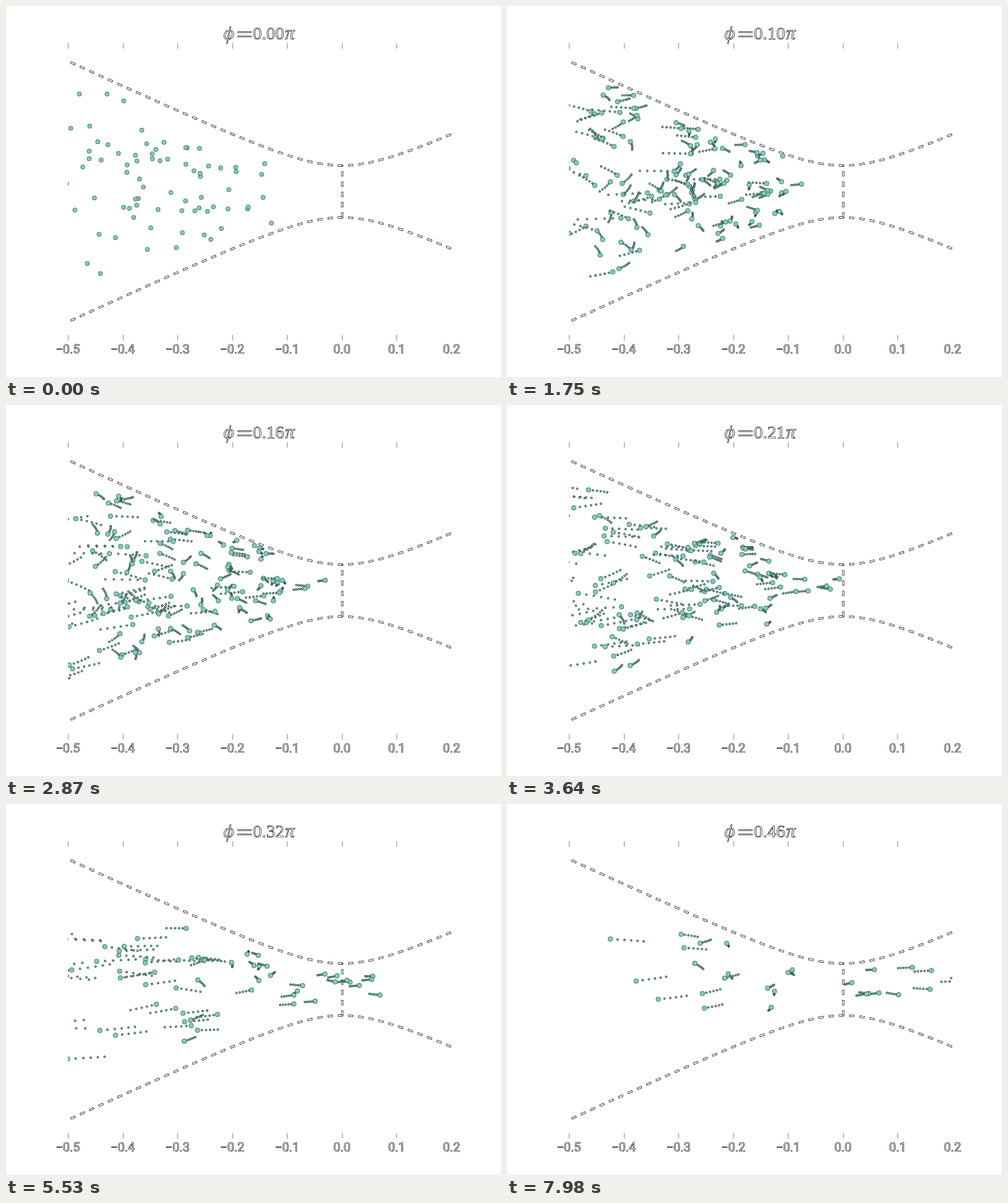
Animation of 800 by 600 pixels, one loop 8000 ms. Source, as an HTML page with a canvas:

```html
<!DOCTYPE html>
<html lang="en">
<head>
<meta charset="utf-8">
<title>Particles at a saddle</title>
<style>
  html, body { margin: 0; width: 100%; height: 100%; overflow: hidden; background: #fff; }
  canvas { display: block; }
</style>
</head>
<body>
<canvas id="stage" width="800" height="600"></canvas>
<script>
const ctx = document.getElementById('stage').getContext('2d');
const LOOP = 8000, STEP = 70, TAIL = 5;
const CX = 543, CY = 300, LEFT = 100, RIGHT = 720, TICK = 620 / 7;
const RATE = 0.036;    // exponential growth of the distance to the barrier, per step
const SWING = 0.018;   // slow vertical oscillation, radians per step

let seed = 11;
function random() {
  seed = (seed * 16807) % 2147483647;
  return seed / 2147483647;
}
const between = (low, high) => low + (high - low) * random();

const halfWidth = x => 42 * Math.hypot(1, (x - CX) / 90);

// Particles climb an inverted parabola: most turn back at distance `reach`, a few cross it.
const particles = [];
function addGroup(count, crosses, firstTurn, lastTurn, minReach, maxReach) {
  for (let i = 0; i < count; i++) {
    const turn = firstTurn + (lastTurn - firstTurn) * (i + random()) / count;
    const reach = between(minReach, maxReach);
    const swing = crosses ? between(15, 40) : 0.97 * halfWidth(CX - reach);
    const phase = Math.acos(between(-1, 0.75)) * (random() < 0.5 ? -1 : 1);
    particles.push({ crosses, turn, reach, swing, phase });
  }
}
addGroup(115, false, 12, 46, 90, 400);
addGroup(20, false, 60, 118, 50, 230);
addGroup(13, true, 52, 110, 45, 85);

function place(p, n) {
  const d = n - p.turn;
  const offset = p.crosses ? Math.sinh(RATE * d) : -Math.cosh(RATE * d);
  return [CX + p.reach * offset, CY + p.swing * Math.cos(SWING * d + p.phase)];
}

function dot([x, y], radius) {
  if (x < LEFT - 5 || x > RIGHT + 5) return;
  ctx.beginPath();
  ctx.arc(x, y, radius, 0, 2 * Math.PI);
  ctx.fill();
  ctx.stroke();
}

function drawParticles(n) {
  ctx.save();
  ctx.beginPath();
  ctx.rect(LEFT, 65, RIGHT - LEFT, 472);
  ctx.clip();
  ctx.fillStyle = '#7fcdbb';
  ctx.strokeStyle = '#1c302c';
  for (const p of particles) {
    ctx.lineWidth = 0.9;
    for (let k = Math.min(TAIL, n); k > 0; k--) dot(place(p, n - k), 1.5);
    ctx.lineWidth = 0.6;
    dot(place(p, n), n ? 3.8 : 3.5);
  }
  ctx.restore();
}

function hollowDashes(path) {
  ctx.strokeStyle = '#111';
  ctx.lineWidth = 3.6;
  ctx.setLineDash([8.3, 8.3]);
  ctx.lineDashOffset = 0;
  ctx.stroke(path);
  ctx.strokeStyle = '#fff';
  ctx.lineWidth = 2.1;
  ctx.setLineDash([6.8, 9.8]);
  ctx.lineDashOffset = -0.75;
  ctx.stroke(path);
  ctx.setLineDash([]);
}

function wallPath(side) {
  const path = new Path2D();
  for (let x = 104.5; x <= RIGHT; x += 1.5) path.lineTo(x, CY + side * halfWidth(x));
  return path;
}
const gate = new Path2D();
gate.moveTo(CX + 0.5, 342);
gate.lineTo(CX + 0.5, 258);
const dashedPaths = [wallPath(-1), wallPath(1), gate];

function hollowText(text, x, y, font, align) {
  ctx.font = font;
  ctx.textAlign = align;
  ctx.strokeStyle = '#000';
  ctx.lineWidth = 0.7;
  ctx.lineJoin = 'round';
  ctx.strokeText(text, x, y);
}

function drawAxis() {
  for (let i = 0; i <= 7; i++) {
    const x = LEFT + i * TICK;
    const label = ((i - 5) / 10).toFixed(1).replace('-', '\u2212');
    hollowText(label, x, 562, '20px Roboto, sans-serif', 'center');
    if (i === 7) continue;
    ctx.fillStyle = '#888';
    ctx.fillRect(Math.round(x), 60, 1, 9);
    ctx.fillRect(Math.round(x), 532, 1, 9);
  }
}

function drawTitle(n) {
  const serif = '"Liberation Serif", serif';
  hollowText('\u03d5', 351, 54, 'italic 27px "Noto Serif", serif', 'left');
  ctx.strokeRect(374.5, 41.5, 22, 1.6);
  ctx.strokeRect(374.5, 48.5, 22, 1.6);
  hollowText((n * 0.004).toFixed(2), 399, 54, '29px ' + serif, 'left');
  hollowText('\u03c0', 451, 54, 'italic 31px ' + serif, 'left');
}

let shown = -1;
function frame(now) {
  const n = Math.floor((now % LOOP) / STEP);
  if (n !== shown) {
    shown = n;
    ctx.fillStyle = '#fff';
    ctx.fillRect(0, 0, 800, 600);
    drawAxis();
    drawTitle(n);
    dashedPaths.forEach(hollowDashes);
    drawParticles(n);
  }
  requestAnimationFrame(frame);
}
requestAnimationFrame(frame);
</script>
</body>
</html>
```
